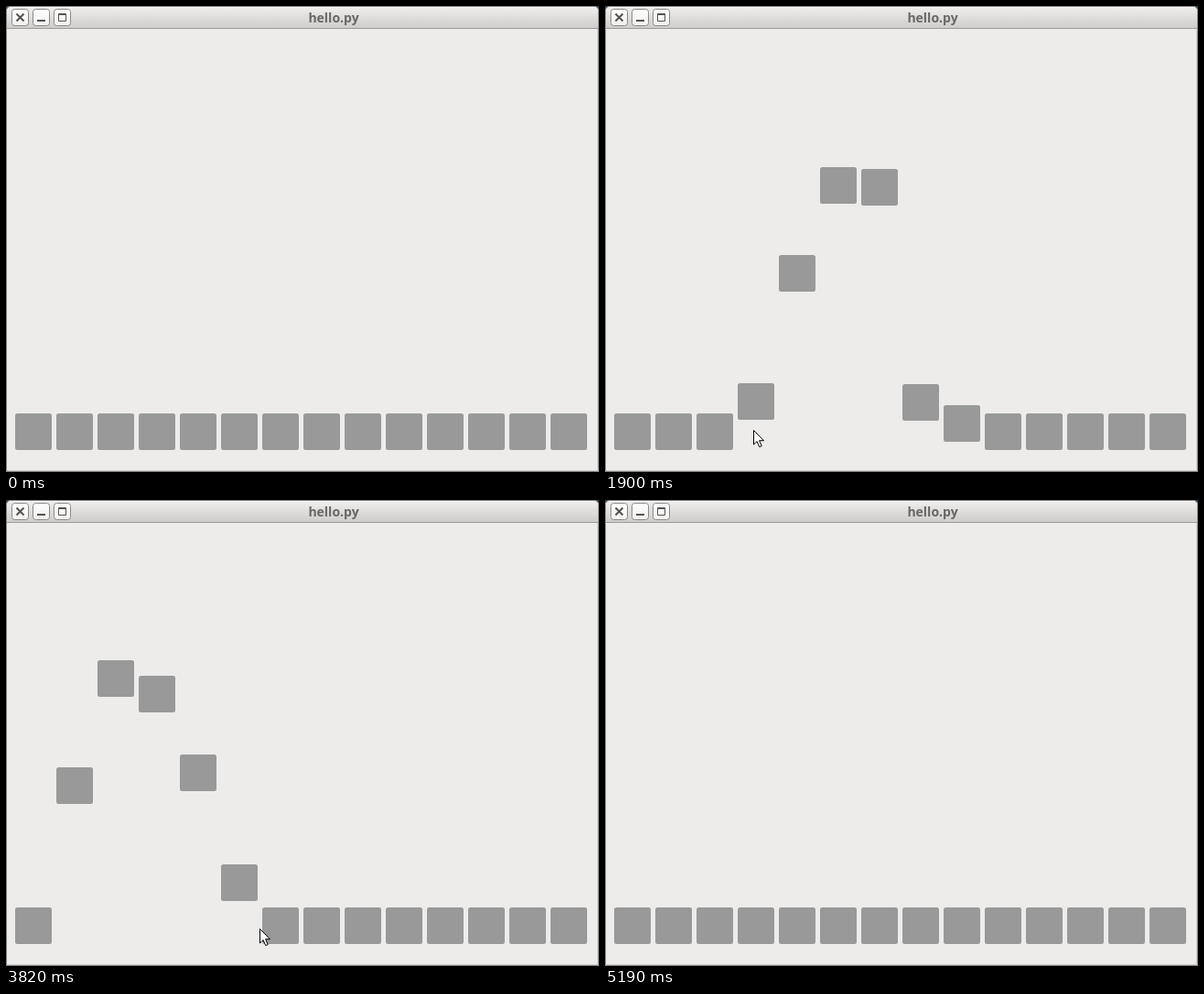
These frames come from a looping animation (648 by 509 pixels, 6580 ms). An HTML page:

```html
<!DOCTYPE html>
<html lang="en">
<head>
<meta charset="utf-8">
<title>hello.py</title>
<style>
  html, body { margin: 0; width: 100%; height: 100%; overflow: hidden; background: #edecea; }
  svg { display: block; width: 100vw; height: 100vh; }
  text { font: 700 14px "Open Sans", "Noto Sans", sans-serif; fill: #696765; text-anchor: middle; }
</style>
</head>
<body>
<svg viewBox="0 0 648 509">
  <defs>
    <linearGradient id="bar" x2="0" y2="1">
      <stop offset="0" stop-color="#efeeed"/>
      <stop offset="1" stop-color="#cfcdcb"/>
    </linearGradient>
    <linearGradient id="face" x2="0" y2="1">
      <stop offset="0" stop-color="#fff"/>
      <stop offset="1" stop-color="#f1f0ef"/>
    </linearGradient>
  </defs>

  <!-- window frame -->
  <rect width="648" height="8" fill="#2b4650"/>
  <path d="M.5 508.5V5.5q0-5 5-5h637q5 0 5 5v503z" fill="#edecea" stroke="#83817f"/>
  <path d="M1 24V6q0-5 5-5h636q5 0 5 5v18z" fill="url(#bar)"/>
  <path d="M5 1.5h638" stroke="#f8f7f6"/>
  <path d="M1 24.5h646" stroke="#9c9a98"/>
  <path d="M646.5 25v483M1 507.5h646" fill="none" stroke="#d0cecc"/>
  <text x="358" y="18">hello.py</text>

  <!-- title bar buttons -->
  <g fill="url(#face)" stroke="#8b8987">
    <rect x="6.5" y="3.5" width="18" height="18" rx="3"/>
    <rect x="29.5" y="3.5" width="18" height="18" rx="3"/>
    <rect x="52.5" y="3.5" width="18" height="18" rx="3"/>
  </g>
  <g fill="none" stroke="#555351">
    <path d="M11.5 8.5l8 8m0-8l-8 8" stroke-width="2"/>
    <path d="M34 16h9" stroke-width="2"/>
    <path d="M57.5 8.5h8v8h-8zM57 9.5h9"/>
  </g>

  <g id="tiles" fill="#999"></g>

  <g id="arrow" fill="#fff" stroke="#000">
    <path d="M.5 .5v15.5l3.6-3.4 2.6 6 2.5-1-2.6-5.9h4.9z"/>
  </g>
  <g id="hand" fill="#fff" stroke="#000">
    <path d="M4.5 9V2Q4.5 .5 6 .5 7.5 .5 7.5 2V5L13 6.5Q15.5 7 15.5 9V15.5H5.5V13L.8 9.2Q.2 7.5 2 7.5z" stroke-width="1.2"/>
    <path d="M7 11.5h7" stroke-dasharray="1 1"/>
  </g>
</svg>
<script>
const LOOP = 6580, COUNT = 14, MARGIN = 10, PITCH = 45, SIZE = 40;
const REST_Y = 445, JUMP = 270, RISE = 357, FALL = 296;
const REACTION = 30; // delay between touching a tile and its jump

// The pointer sweeps left, waits, then sweeps right: key points [time, x].
const leftward = [
  [500, 648], [870, 635], [971, 590], [1081, 500], [1253, 410], [1413, 365], [1503, 320],
  [1540, 280], [1768, 230], [1944, 140], [2206, 95], [2299, 50], [2330, 48], [3200, 47]
];
const rightward = [
  [3200, 47], [3363, 55], [3575, 145], [3693, 190], [3769, 235], [3820, 277],
  [3834, 280], [4053, 370], [4197, 415], [4256, 460], [4290, 505], [4510, 632]
];

const TIME = 0, X = 1;

// Reads one column of a path where another column has the given value.
function along(path, from, to, value) {
  for (let i = 1; i < path.length; i++) {
    const a = path[i - 1], b = path[i];
    const p = (value - a[from]) / (b[from] - a[from]);
    if (p >= 0 && p <= 1) return a[to] + (b[to] - a[to]) * p;
  }
  return NaN;
}

const byId = id => document.getElementById(id);
const arrow = byId("arrow"), hand = byId("hand");

const tiles = Array.from({ length: COUNT }, (_, i) => {
  const left = MARGIN + PITCH * i, right = left + SIZE;
  const rect = document.createElementNS("http://www.w3.org/2000/svg", "rect");
  for (const [name, value] of Object.entries({ x: left, width: SIZE, height: SIZE, rx: 2.5 }))
    rect.setAttribute(name, value);
  byId("tiles").append(rect);
  const jumps = [along(leftward, X, TIME, right), along(rightward, X, TIME, left)].map(t => t + REACTION);
  return { rect, left, right, jumps };
});

const outCubic = p => 1 - (1 - p) ** 3;

function outBounce(p) {
  const k = 7.5625, d = 2.75;
  if (p < 1 / d) return k * p * p;
  if (p < 2 / d) return k * (p - 1.5 / d) ** 2 + 0.75;
  if (p < 2.5 / d) return k * (p - 2.25 / d) ** 2 + 0.9375;
  return k * (p - 2.625 / d) ** 2 + 0.984375;
}

function lift(age) {
  if (age < 0 || age > RISE + FALL) return 0;
  return age < RISE ? outCubic(age / RISE) : 1 - outBounce((age - RISE) / FALL);
}

function tileTop({ jumps: [first, second] }, t) {
  return Math.round(REST_Y - JUMP * lift(t - (t >= second ? second : first)));
}

// The way back follows a shallow arc.
function pointerAt(t) {
  const goingLeft = t < 3200;
  const x = along(goingLeft ? leftward : rightward, TIME, X, t);
  const y = goingLeft ? 467 - x / 40 : 468 - ((x - 210) / 98) ** 2;
  return [Math.round(x), Math.round(y)];
}

function place(cursor, visible, x, y) {
  cursor.style.display = visible ? "" : "none";
  if (visible) cursor.setAttribute("transform", `translate(${x} ${y})`);
}

function draw(t) {
  const [x, y] = pointerAt(t), present = !isNaN(x);
  let over = false;
  for (const tile of tiles) {
    const top = tileTop(tile, t);
    tile.rect.setAttribute("y", top);
    over ||= x >= tile.left && x < tile.right && y >= top && y < top + SIZE;
  }
  place(arrow, present && !over, x, y);
  place(hand, present && over, x - 6, y);
}

const begin = performance.now();
function tick() {
  draw((performance.now() - begin) % LOOP);
  requestAnimationFrame(tick);
}
tick();
</script>
</body>
</html>
```
